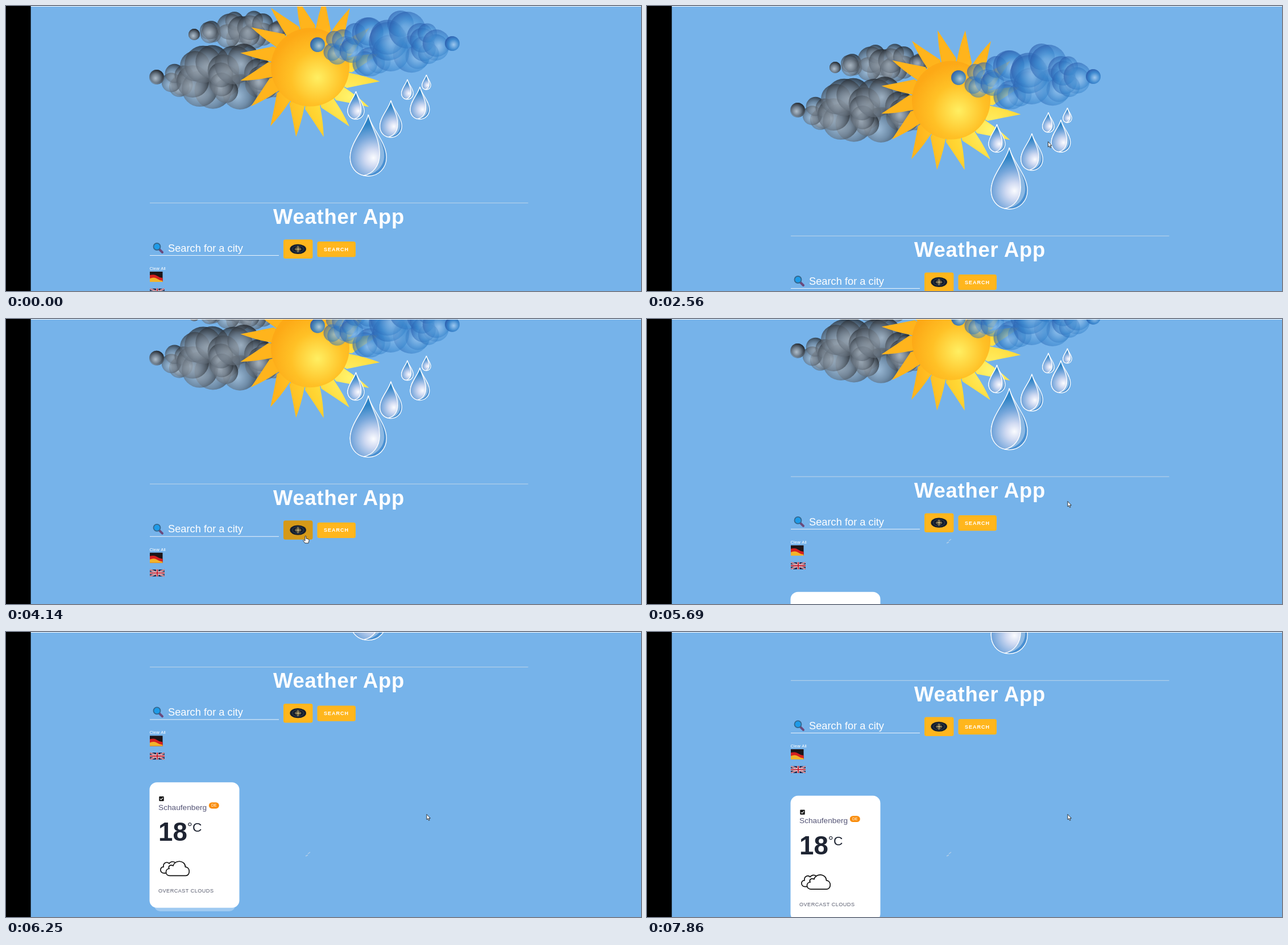
Recreate the animation shown at these times as an HTML page. Size 1117 by 501 pixels, loop 7990 ms.

```html
<!DOCTYPE html>
<html lang="en">
<head>
<meta charset="utf-8">
<title>Weather App</title>
<style>
  html, body { margin: 0; width: 100%; height: 100%; overflow: hidden; background: #76b3ea; }
  svg { display: block; font-family: "Liberation Sans", Arial, sans-serif; }
  .bold { font-weight: bold; }
  .title { font-size: 36.5px; letter-spacing: .02em; }
  .drop path { vector-effect: non-scaling-stroke; }
</style>
</head>
<body>
<svg width="1117" height="501" viewBox="0 0 1117 501">
  <defs>
    <radialGradient id="gray" cx=".42" cy=".62" r=".66">
      <stop offset="0" stop-color="#b4c0cb" stop-opacity=".6"/>
      <stop offset=".5" stop-color="#6c7885" stop-opacity=".65"/>
      <stop offset="1" stop-color="#191d22" stop-opacity=".8"/>
    </radialGradient>
    <radialGradient id="blue" cx=".6" cy=".58" r=".66">
      <stop offset="0" stop-color="#a4cbf0" stop-opacity=".5"/>
      <stop offset=".55" stop-color="#3583cb" stop-opacity=".5"/>
      <stop offset="1" stop-color="#2a55a6" stop-opacity=".65"/>
    </radialGradient>
    <radialGradient id="disc" gradientUnits="userSpaceOnUse" cx="548" cy="126" r="84">
      <stop offset="0" stop-color="#ffef62"/>
      <stop offset=".55" stop-color="#ffc126"/>
      <stop offset="1" stop-color="#fda916"/>
    </radialGradient>
    <radialGradient id="rays" gradientUnits="userSpaceOnUse" cx="605" cy="160" r="130">
      <stop offset="0" stop-color="#fff36c"/>
      <stop offset=".5" stop-color="#ffd633"/>
      <stop offset="1" stop-color="#ffb41c"/>
    </radialGradient>
    <radialGradient id="water" gradientUnits="userSpaceOnUse" cx="9" cy="76" r="60">
      <stop offset="0" stop-color="#fbfcff"/>
      <stop offset=".25" stop-color="#d0daf2"/>
      <stop offset=".62" stop-color="#79a8dc"/>
      <stop offset="1" stop-color="#2e84c6"/>
    </radialGradient>
    <g id="drop" class="drop" stroke="#fff" stroke-width="1.3">
      <path fill="#4990d2" d="M0 0C4 22 32 48 32 75 32 94 18 108 0 108S-32 94-32 75C-32 48-4 22 0 0Z"/>
      <path fill="#c5daf3" fill-opacity=".55" stroke="none" d="M0 0C4 22 28 44 28 72 28 92 12 106-8 107 8 104 20 90 20 70 20 40 6 25 0 0Z"/>
      <path fill="url(#water)" d="M0 0C6 25 20 40 20 70 20 90 8 104-8 107-22 104-32 92-32 75-32 48-4 22 0 0Z"/>
    </g>
    <clipPath id="jack"><path d="M253 496.5h26v12.5h-26z"/></clipPath>
  </defs>

  <g id="page">
    <g id="storm" fill="url(#gray)"></g>
    <path id="corona" fill="url(#rays)"/>
    <circle cx="535" cy="107.5" r="69" fill="url(#disc)"/>
    <g id="rain" fill="url(#blue)"></g>
    <g id="drops"></g>

    <path d="M253 346.2H918.5" stroke="#e6e8ea" stroke-opacity=".65"/>
    <text class="bold title" x="470" y="383" fill="#fff">Weather App</text>

    <path d="M269 427l6 6" stroke="#6b4a7c" stroke-width="4" stroke-linecap="round"/>
    <circle cx="265.5" cy="423" r="6" fill="#1e9be8" stroke="#34678f" stroke-width="1.8"/>
    <text x="285" y="431.7" font-size="18.27" fill="#fff">Search for a city</text>
    <path d="M253 438.5H480" stroke="#fff" stroke-opacity=".85"/>

    <rect x="488" y="410.5" width="51.5" height="33.5" rx="3.5" fill="#ffb61d"/>
    <rect id="shade" x="488" y="410.5" width="51.5" height="33.5" rx="3.5"/>
    <ellipse cx="513.7" cy="427.3" rx="14.3" ry="8.6" fill="#151d2b"/>
    <ellipse cx="513.7" cy="427.3" rx="10" ry="6" fill="none" stroke="#33445a"/>
    <circle cx="513.7" cy="427.3" r="4" fill="none" stroke="#b79a58" stroke-width=".8"/>
    <path d="M513.7 420.5l.9 5.9 5.9.9-5.900.9-.9 5.900-.9-5.900-5.900-.9 5.900-.9z" fill="#d8c07c"/>
    <rect x="547.5" y="414" width="67.5" height="27.3" rx="3.5" fill="#ffb61d"/>
    <text class="bold" x="559" y="430.7" font-size="9.14" letter-spacing=".914" fill="#fff">SEARCH</text>

    <text x="252.5" y="464" font-size="7.6" fill="#fff">Clear All</text>
    <path d="M253 467h22.5v18H253z" fill="#1c1518"/>
    <path d="M253 473q8-2 12 1t10.5 4V485H253z" fill="#d5201f"/>
    <path d="M253 479q8-3 12 0t10.5 4V485H253z" fill="#f2b32a"/>
    <g clip-path="url(#jack)">
      <path d="M253 496.5h26v12.5h-26z" fill="#1b2348"/>
      <path d="M253 496.5l26 12.5M253 509l26-12.5" stroke="#e8e6ec" stroke-width="2.6"/>
      <path d="M253 496.5l26 12.5M253 509l26-12.5" stroke="#c22334"/>
      <path d="M253 502.7h26M266 496v13" stroke="#f0eef2" stroke-width="4"/>
      <path d="M253 502.7h26M266 496v13" stroke="#c22334" stroke-width="2.2"/>
    </g>

    <g id="card" transform="translate(0 284.5)">
      <rect x="261" y="440" width="142" height="51" rx="10" fill="#fff" fill-opacity=".3"/>
      <rect x="252.5" y="264.3" width="158" height="220.5" rx="13" fill="#fff"/>
      <rect x="269.3" y="289" width="8.4" height="8.4" rx="1" fill="#111"/>
      <path d="M271 293.3l1.8 1.8 3.3-3.7" fill="none" stroke="#fff" stroke-width="1.2"/>
      <text x="268" y="312.8" font-size="13.7" fill="#565677">Schaufenberg</text>
      <rect x="356.8" y="299.7" width="18" height="10.8" rx="5.4" fill="#f98c0a"/>
      <text x="361" y="307.4" font-size="6.85" fill="#fff">DE</text>
      <text class="bold" x="268" y="367.5" font-size="45.7" fill="#1e2432">18</text>
      <text x="318.8" y="351.5" font-size="22.85" fill="#1e2432">°C</text>
      <g fill="none" stroke="#111" stroke-width="1.7">
        <path d="M281 424H278C270 424 270 413 277 413 276 406 283 403 287 407 290 403 296 403 298 406"/>
        <path d="M288 428.5H316C324 428.5 325 414 315.5 413 315 401 297 400 294 411 288 408 285 413 287 416 279 417 280 428.5 288 428.5Z"/>
      </g>
      <text x="268" y="458.3" font-size="9.14" letter-spacing=".05em" fill="#565a6c">OVERCAST CLOUDS</text>
    </g>
  </g>

  <path id="smudge" d="M527 394l4-2M531 390l4-3" stroke="#d5dde6" stroke-width="1.4" opacity=".6"/>
  <path d="M43 0H1117V1H43z" fill="#fff"/>
  <path d="M0 0H43.6V501H0z"/>

  <g id="cursor" fill="#fff" stroke="#111" stroke-width=".8" stroke-linejoin="round">
    <path id="arrow" d="M.5 .5V9.8L2.6 7.9 4.1 11.3 5.6 10.6 4.2 7.4H7z"/>
    <path id="hand" d="M0 1Q1 -.5 2 1V5L6 6Q7.5 6.5 7 9L6 13H0L-3.5 8.5Q-3 7 -1.5 8L0 9z"/>
  </g>
</svg>
<script>
const LOOP = 7990;
const TOP = 58, BOTTOM = -317.3, NOTCH = 57.1;
const $ = id => document.getElementById(id);
const ease = p => p * p * (3 - 2 * p);
const clamp = (v, lo = 0, hi = 1) => Math.min(hi, Math.max(lo, v));

let seed = 7;
const random = () => (seed = seed * 16807 % 2147483647) / 2147483647;

// Packs translucent balls around the inside of each lobe
function cloud(id, lobes) {
  let balls = '';
  for (const [x, y, size] of lobes) {
    const count = Math.round(2 + size / 9);
    for (let i = 0; i < count; i++) {
      const r = Math.min(size, 8 + size * (.2 + .25 * random()));
      const a = i / count * 2 * Math.PI + random(), d = size - r;
      balls += `<circle cx="${x + d * Math.cos(a)}" cy="${y + d * Math.sin(a)}" r="${r}"/>`;
    }
  }
  $(id).innerHTML += balls;
}
cloud('storm', [[331,50,10], [360,46,20], [402,45,35], [440,42,34], [478,42,17]]);
cloud('storm', [[265,125,13], [303,130,30], [356,125,57], [414,124,58], [460,130,34]]);
cloud('rain', [[548,68,13], [588,72,32], [638,72,52], [696,66,58], [745,66,36], [785,66,13]]);

// Tip x, tip y, height
$('drops').innerHTML = [
  [615.5,150,49], [677,166,65], [728,142,57], [706,129,35], [739.5,121,26], [637.3,191,108]
].map(([x, y, h]) => `<use href="#drop" transform="translate(${x} ${y}) scale(${h / 108})"/>`).join('');

// Swept sun rays
const polar = (deg, r) => {
  const a = deg * Math.PI / 180;
  return `${535 + r * Math.cos(a)} ${107.5 + r * Math.sin(a)} `;
};
let corona = '';
for (let a = 11.5; a < 360; a += 22.5)
  corona += `M${polar(a - 4, 64)}L${polar(a - 3, 74)}Q${polar(a - 2.5, 98)}${polar(a, 125)}` +
            `Q${polar(a + 6.5, 98)}${polar(a + 18, 74)}L${polar(a + 18, 64)}Z`;
$('corona').setAttribute('d', corona);

// Wheel turns: start, notches (positive reveals the top)
const wheel = [[1792,2], [2560,-1], [3390,-1], [5598,-4], [6490,-1], [7620,1]];

function scrollAt(t) {
  let from = 0, y = 0;
  for (const [start, notches] of wheel) {
    const to = clamp(from + notches * NOTCH, BOTTOM, TOP), span = 130 + 2.25 * Math.abs(to - from);
    y += (to - from) * ease(clamp((t - start) / span));
    from = to;
  }
  return y;
}

// Pointer moves: start, end, x, y
const moves = [
  [620,1390,792,270], [1390,1810,705,238], [2800,3080,685,263],
  [3670,4080,526,381], [4740,5560,739.5,320]
];

function cursorAt(t) {
  let x = 1065, y = 482;
  for (const [start, end, toX, toY] of moves) {
    const p = clamp((t - start) / (end - start));
    x += (toX - x) * p;
    y += (toY - y) * p;
  }
  return [x, y];
}

const show = (id, on) => $(id).style.display = on ? '' : 'none';

function draw() {
  const t = performance.now() % LOOP;
  const offset = scrollAt(t), [x, y] = cursorAt(t);
  const over = x > 488 && x < 540 && y - offset > 410 && y - offset < 444;
  $('page').setAttribute('transform', `translate(0 ${offset})`);
  $('cursor').setAttribute('transform', `translate(${x} ${y})`);
  $('shade').setAttribute('opacity', .19 * clamp((t - 4030) / 130) * clamp((5000 - t) / 200));
  show('cursor', t >= 620);
  show('arrow', !over);
  show('hand', over);
  show('card', t >= 5350);
  show('smudge', t >= 4850);
  requestAnimationFrame(draw);
}
draw();
</script>
</body>
</html>
```
